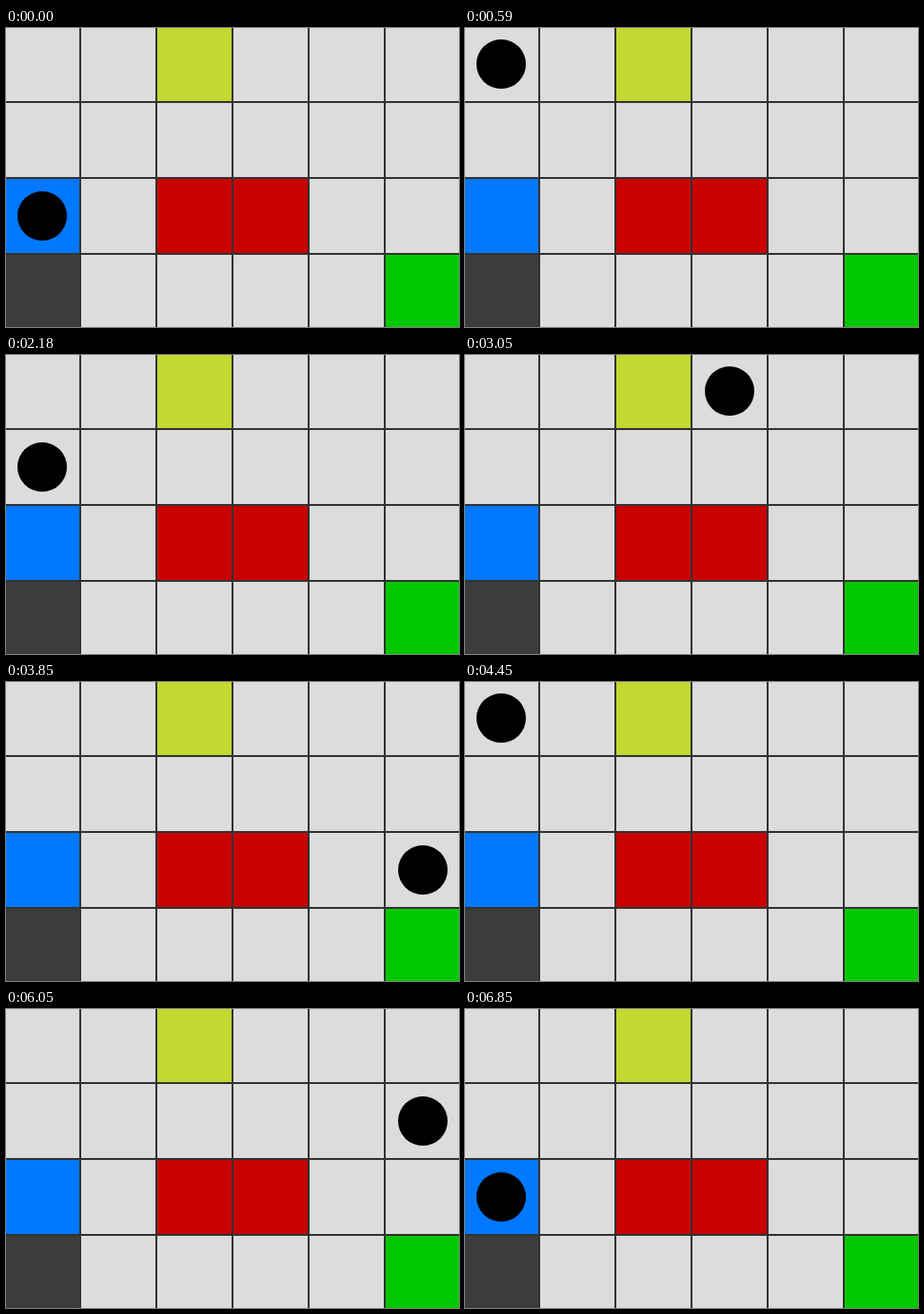
Animation, 476 px wide and 315 px high, one loop 7050 ms. Source, as an HTML page with a canvas:

```html
<!DOCTYPE html>
<html lang="en">
<head>
<meta charset="utf-8">
<title>Grid world agent</title>
<style>
  html, body { margin: 0; width: 100%; height: 100%; overflow: hidden; }
  canvas { display: block; }
</style>
</head>
<body>
<canvas id="stage" width="476" height="315"></canvas>
<script>
const ctx = document.getElementById('stage').getContext('2d');
const CELL = 80, OFFSET = -2, COLS = 6, ROWS = 4;
const START = [0, 2];
const special = {
  '2,0': '#c3d931', '0,2': '#0078ff', '2,2': '#c80000',
  '3,2': '#c80000', '0,3': '#3c3c3c', '5,3': '#00c800'
};

// U, D, L, R move one cell; S returns to the start for a new episode.
const moves = 'UURRRRRDDS' + 'UURRRRRDDS' + 'UURRRRRDUDDUDS';
const delta = { U: [0, -1], D: [0, 1], L: [-1, 0], R: [1, 0] };
const STEP = 200;
const unevenSteps = { 4: 190, 10: 190, 11: 220, 12: 180, 13: 220, 14: 220,
                      15: 210, 16: 220, 23: 190, 24: 210 };

const poses = [START];
for (const move of moves) {
  const [col, row] = poses.at(-1);
  poses.push(move === 'S' ? START : [col + delta[move][0], row + delta[move][1]]);
}
let duration = 0;
const ends = poses.map((_, i) => duration += unevenSteps[i] ?? STEP);

function drawGrid() {
  for (let row = 0; row < ROWS; row++) {
    for (let col = 0; col < COLS; col++) {
      const x = OFFSET + col * CELL, y = OFFSET + row * CELL;
      ctx.fillStyle = '#323232';
      ctx.fillRect(x, y, CELL, CELL);
      ctx.fillStyle = special[[col, row]] ?? '#dcdcdc';
      ctx.fillRect(x + 1, y + 1, CELL - 2, CELL - 2);
    }
  }
}

function drawAgent([col, row]) {
  ctx.fillStyle = '#000';
  ctx.beginPath();
  ctx.arc(OFFSET + (col + 0.5) * CELL, OFFSET + (row + 0.5) * CELL, 26, 0, 2 * Math.PI);
  ctx.fill();
}

function render() {
  const time = performance.now() % duration;
  drawGrid();
  drawAgent(poses[ends.findIndex(end => time < end)]);
  requestAnimationFrame(render);
}
render();
</script>
</body>
</html>
```
